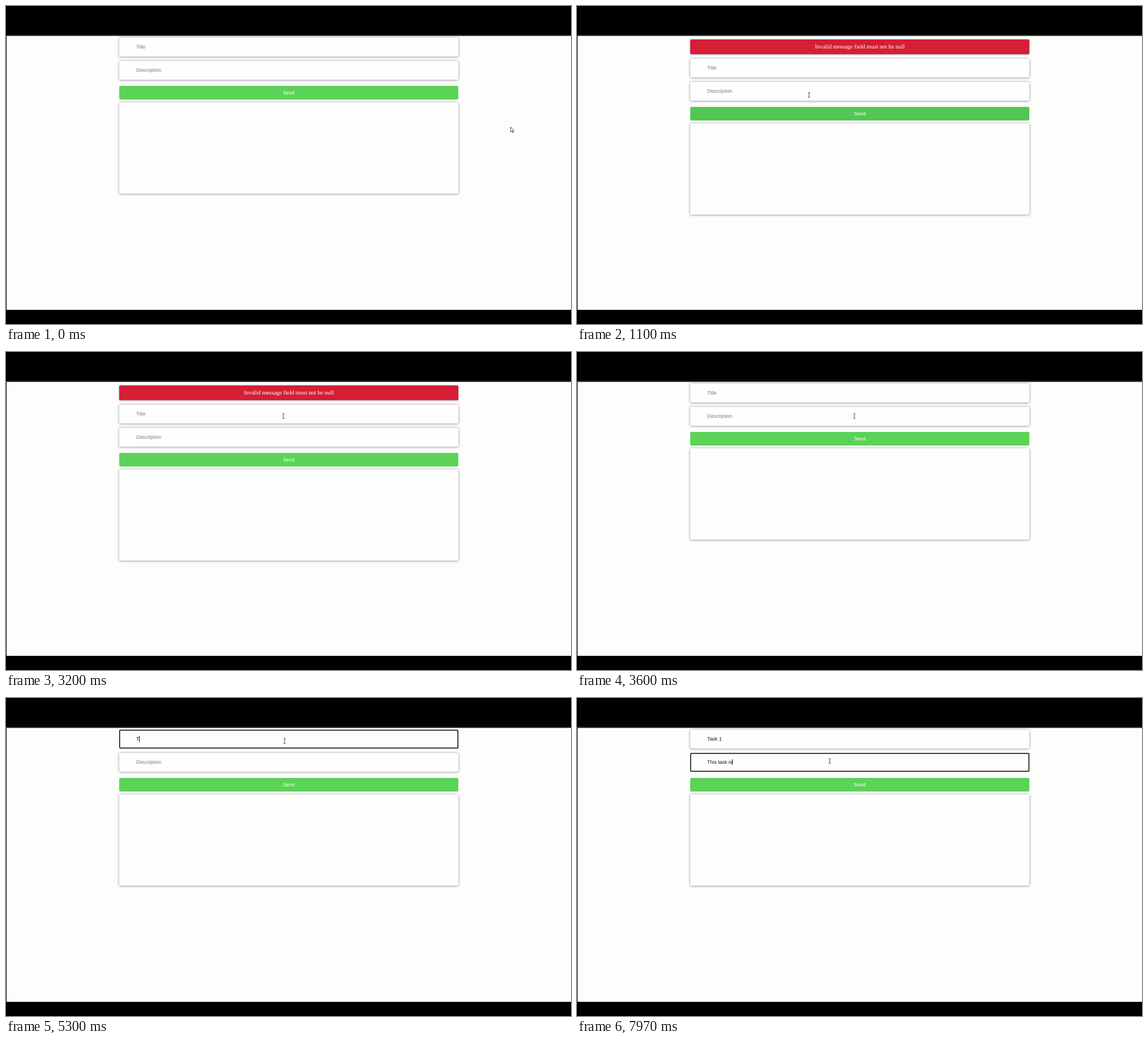
An HTML page that plays this animation: 998x561 px, repeating every 8 s.

```html
<!DOCTYPE html>
<html lang="en">
<head>
<meta charset="utf-8">
<title>Task form</title>
<style>
  html, body { margin: 0; width: 100%; height: 100%; overflow: hidden; background: #000; }
  #stage { position: relative; width: 998px; height: 561px; overflow: hidden; background: #000; text-rendering: geometricPrecision; }
  #stage div, #stage svg { position: absolute; box-sizing: border-box; }
  #edge { left: 0; top: 51px; width: 998px; height: 2px; background: #3c3c42; }
  #page { left: 1px; top: 53px; width: 997px; height: 482.5px; background: #fdfdfc; }
  #form, #banner { left: 200px; width: 599px; }
  #form { top: 0; }
  #form > div { left: 0; width: 599px; border-radius: 2px; }
  .card { background: #fefefd; box-shadow: 0 0.5px 4px rgba(50, 50, 85, .58); }
  .field, #send { font: 8.85px "Liberation Sans", Arial, sans-serif; }
  .field { height: 33px; padding-left: 30px; line-height: 33px; white-space: pre; }
  .field.focus { box-shadow: inset 0 0 0 1.5px #0c0c0c, 0 0 1px #0c0c0c; }
  .field span { position: relative; display: inline-block; }
  .field i { position: absolute; top: 11px; width: 1px; height: 10.5px; background: #111; }
  #title { top: 56px; }
  #description { top: 96.5px; }
  #send { top: 141px; height: 23.5px; line-height: 24px; text-align: center; color: #fff; }
  #list { top: 169.5px; height: 161px; }
  #banner { top: 58.5px; height: 26.5px; border-radius: 2px; background: #d41f35; color: #fff; text-align: center;
    font: 10.4px/27px "Liberation Serif", Times, serif; box-shadow: 0 0.5px 3px rgba(50, 50, 85, .6); }
  #popup { left: 252px; top: 134.5px; width: 37px; height: 40.5px; border-radius: 2px; background: #222; color: #fff;
    padding: 2.5px 6px; font: 6.9px/18px "Open Sans", sans-serif; }
  #popup::before { content: ""; position: absolute; left: 6px; top: -5px; border: 5px solid transparent;
    border-top: 0; border-bottom-color: #222; }
  #cursor { left: 0; top: 0; width: 1px; height: 1px; overflow: visible; }
</style>
</head>
<body>
<div id="stage">
  <div id="edge"></div>
  <div id="page"></div>
  <div id="banner">Invalid message field must not be null</div>
  <div id="form">
    <div id="title" class="card field"><span><b style="font-weight:400"></b><i></i></span></div>
    <div id="description" class="card field"><span><b style="font-weight:400"></b><i></i></span></div>
    <div id="send">Send</div>
    <div id="list" class="card"></div>
  </div>
  <div id="popup">igbgi<br>adfaf</div>
  <svg id="cursor">
    <path id="arrow" d="M0.5 0.5V9.3L2.5 7.5L3.9 10.6L5.1 10L3.8 7.1H6.3Z" fill="#fff" stroke="#222" stroke-width=".8"/>
    <path id="beam" d="M-1.9 -4.2H-.5L0 -3.8L.5 -4.2H1.9M0 -3.8V3.8M-1.9 4.2H-.5L0 3.8L.5 4.2H1.9" fill="none" stroke="#333" stroke-width=".9"/>
    <path id="hand" d="M-.8 .6Q0 -.5 .8 .6V4L4.3 5V8L3.3 10.6H-1L-3.3 6.8Q-2.8 5.6 -.8 7Z" fill="#fff" stroke="#222" stroke-width=".7"/>
  </svg>
</div>
<script>
const LOOP = 8000;
const BANNER_ON = 1040, BANNER_OFF = 3540, BANNER_SHIFT = 37;
const HOVER_ON = 700;
const GREEN = [91, 211, 87], HOVER_GREEN = [80, 193, 82];

const fields = [
  { id: "title", hint: "Title", text: "Task 1", focus: 4000, blur: 6200, start: 5230, step: 110 },
  { id: "description", hint: "Description", text: "This task is", focus: 6200, blur: LOOP, start: 6490, step: 115 }
];

// time, x, y of the pointer
const path = [
  [0, 891, 213], [150, 891, 213], [780, 410, 157], [1700, 410, 157], [2200, 512, 77],
  [2530, 512, 77], [2950, 490, 113], [3620, 490, 113], [3900, 492, 76],
  [5880, 492, 76], [6140, 446.5, 111], [LOOP, 446.5, 111]
];

const el = id => document.getElementById(id);
const ramp = (t, from, to) => Math.min(1, Math.max(0, (t - from) / (to - from)));
const ease = p => p * p * (3 - 2 * p);
const mix = (a, b, p) => a + (b - a) * p;
const between = (v, a, b) => v >= a && v < b;

function pointerAt(t) {
  const i = path.findIndex(point => point[0] > t);
  const [t0, x0, y0] = path[i - 1], [t1, x1, y1] = path[i];
  const p = ease(ramp(t, t0, t1));
  return [mix(x0, x1, p), mix(y0, y1, p)];
}

function pointerShape(x, y, shift) {
  const formY = y - shift;
  const overText = shift && between(x, 420, 579) && between(y, 65, 79);
  if (overText) return "beam";
  if (!between(x, 200, 799)) return "arrow";
  if (between(formY, 56, 89) || between(formY, 96.5, 129.5)) return "beam";
  return between(formY, 141, 164.5) ? "hand" : "arrow";
}

function drawField(f, t) {
  const box = el(f.id), label = box.querySelector("b"), caret = box.querySelector("i");
  const count = Math.min(f.text.length, Math.max(0, Math.floor((t - f.start) / f.step) + 1));
  const focused = between(t, f.focus, f.blur);
  const lastInput = count ? f.start + (count - 1) * f.step : f.focus;
  label.textContent = count ? f.text.slice(0, count) : f.hint;
  label.style.color = count ? "#111" : "#777";
  box.classList.toggle("focus", focused);
  caret.style.left = count ? "100%" : "0";
  caret.style.opacity = focused && (t - lastInput) % 1000 < 500 ? 1 : 0;
}

function draw(t) {
  const bannerShown = between(t, BANNER_ON, BANNER_OFF);
  const shift = bannerShown ? BANNER_SHIFT : 0;
  el("banner").style.display = bannerShown ? "block" : "none";
  el("form").style.top = shift + "px";
  fields.forEach(f => drawField(f, t));

  const hover = ramp(t, HOVER_ON, HOVER_ON + 200) * (1 - ramp(t, BANNER_ON, BANNER_ON + 200));
  el("send").style.background = `rgb(${GREEN.map((c, i) => mix(c, HOVER_GREEN[i], hover))})`;
  el("popup").style.opacity = ramp(t, 6280, 6400) * (1 - ramp(t, 6510, 6640));

  const [x, y] = pointerAt(t), shape = pointerShape(x, y, shift);
  el("cursor").style.transform = `translate(${x}px, ${y}px)`;
  for (const id of ["arrow", "beam", "hand"]) el(id).style.display = id === shape ? "inline" : "none";
}

function tick() {
  draw(performance.now() % LOOP);
  requestAnimationFrame(tick);
}
tick();
</script>
</body>
</html>
```
